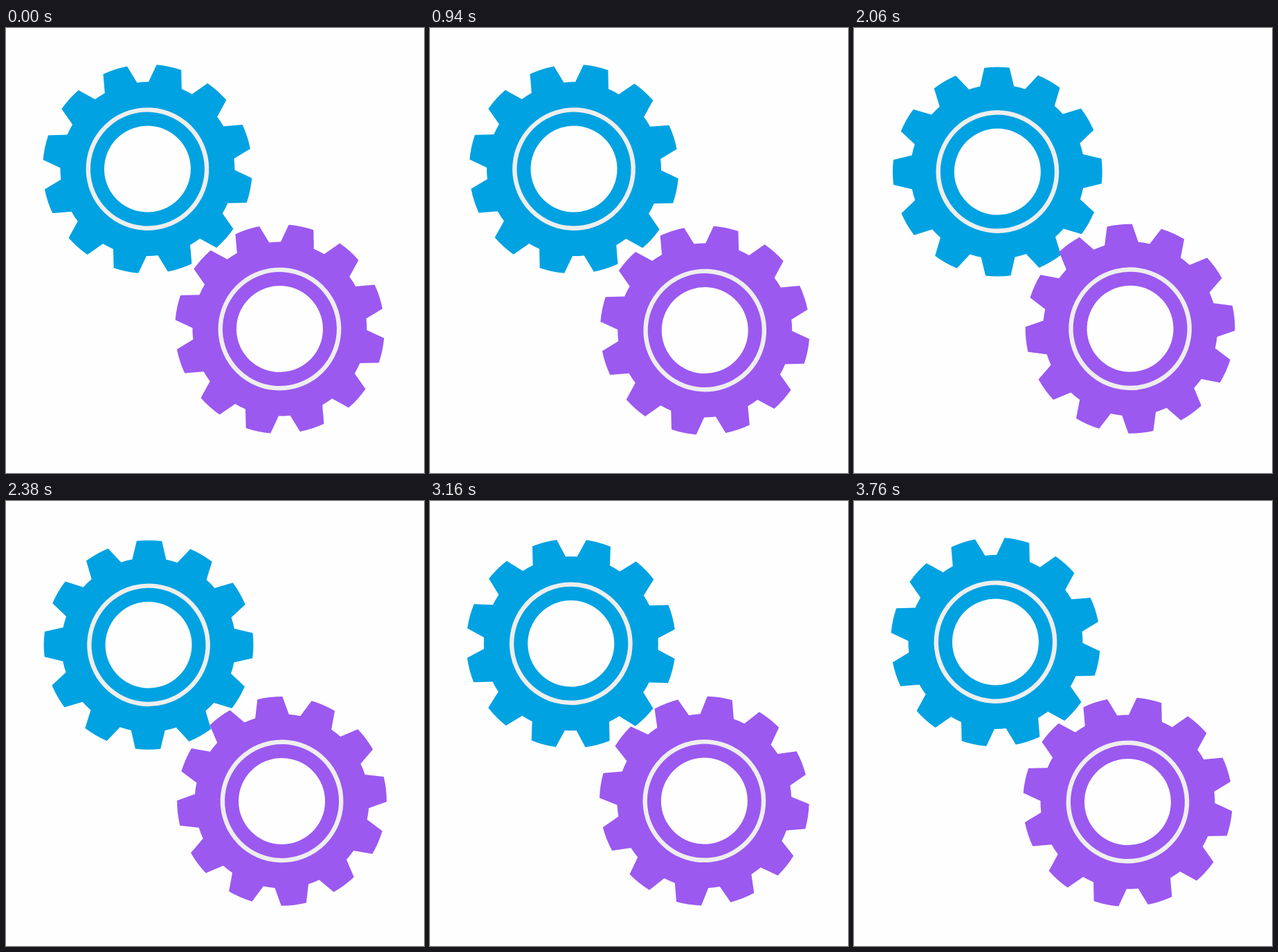
An HTML page with a canvas for the animation above (3.78 s loop, 604 by 644 pixels).

```html
<!DOCTYPE html>
<html lang="en">
<head>
<meta charset="utf-8">
<title>Two turning gears</title>
<style>
  html, body { margin: 0; width: 100%; height: 100%; overflow: hidden; background: #fefefe; }
  canvas { display: block; }
</style>
</head>
<body>
<canvas id="stage" width="604" height="644"></canvas>
<script>
const ctx = document.getElementById('stage').getContext('2d');
const PAPER = '#fefefe';
const RAD = Math.PI / 180;
const LOOP = 3780, STEP = 20, TURN = 3750;
const TEETH = 12, TIP = 151.4, ROOT = 126;
const TIP_HALF = 6.9 * RAD, ROOT_HALF = 11.2 * RAD;

// Each gear turns about an axis slightly off its own centre.
const gears = [
  { x: 206.2, y: 205.8, wobble: 2.5, wobbleStart: -135, toothStart: -18.1, dir: 1, color: '#00a2e2' },
  { x: 397.3, y: 435.7, wobble: 1.85, wobbleStart: 183, toothStart: -18.1, dir: -1, color: '#9b59f0' }
];

function gearOutline() {
  const path = new Path2D();
  for (let i = 0; i < TEETH; i++) {
    const a = i * 2 * Math.PI / TEETH - Math.PI / 2;
    const next = a + 2 * Math.PI / TEETH;
    path.arc(0, 0, TIP, a - TIP_HALF, a + TIP_HALF);
    path.arc(0, 0, ROOT, a + ROOT_HALF, next - ROOT_HALF);
  }
  path.closePath();
  return path;
}
const outline = gearOutline();

function circle(radius) {
  ctx.beginPath();
  ctx.arc(0, 0, radius, 0, 2 * Math.PI);
}

function drawGear(gear, degrees) {
  const turn = gear.dir * degrees;
  const axis = (gear.wobbleStart + turn) * RAD;
  ctx.save();
  ctx.translate(gear.x + gear.wobble * Math.cos(axis), gear.y + gear.wobble * Math.sin(axis));
  ctx.rotate((gear.toothStart + turn) * RAD);
  ctx.fillStyle = gear.color;
  ctx.fill(outline);
  ctx.strokeStyle = '#eeeeee';
  ctx.lineWidth = 6.4;
  circle(85.7);
  ctx.stroke();
  ctx.fillStyle = PAPER;
  circle(62.5);
  ctx.fill();
  ctx.restore();
}

function draw(ms) {
  const time = Math.floor((ms % LOOP) / STEP) * STEP;
  // The turn is complete before the loop ends, so the start pose is held briefly.
  const degrees = time < TURN ? 360 * time / TURN : 0;
  ctx.fillStyle = PAPER;
  ctx.fillRect(0, 0, 604, 644);
  gears.forEach(gear => drawGear(gear, degrees));
}

let start;
function tick(now) {
  start ??= now;
  draw(Math.max(0, now - start));
  requestAnimationFrame(tick);
}
draw(0);
requestAnimationFrame(tick);
</script>
</body>
</html>
```
